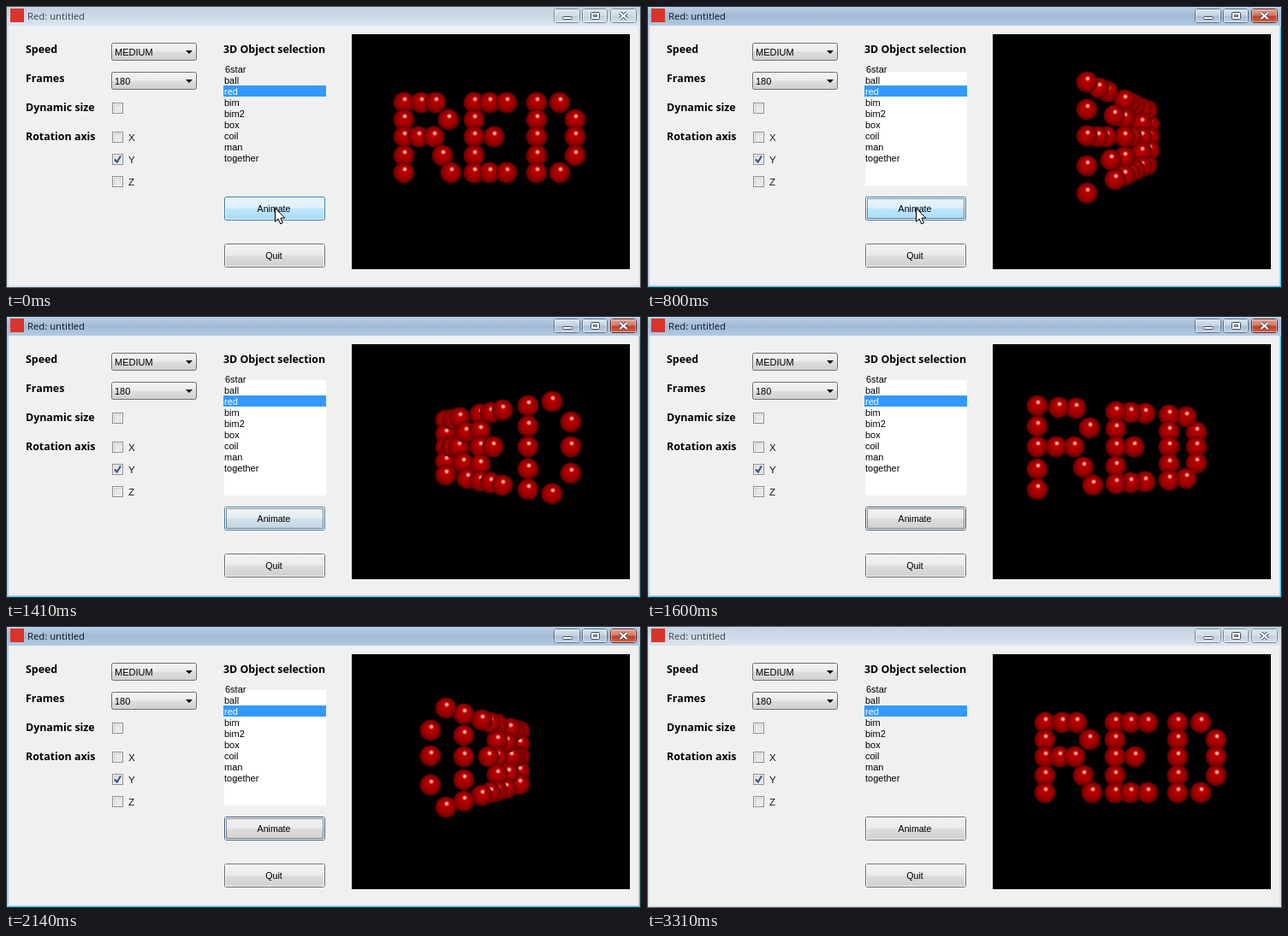
An HTML page with a canvas that plays this animation: 742 px wide and 330 px high, repeating every 3410 ms.

```html
<!DOCTYPE html>
<html lang="en">
<head>
<meta charset="utf-8">
<title>Rotating spheres</title>
<style>
  html, body { margin: 0; width: 100%; height: 100%; overflow: hidden; }
  canvas { display: block; width: 742px; height: 330px; }
</style>
</head>
<body>
<canvas id="stage" width="742" height="330"></canvas>
<script>
const ctx = document.getElementById('stage').getContext('2d');

const LOOP = 3410, START = 550, END = 3310, STEP = 1900 / 31;
const UI = '11px "Liberation Sans", Arial, sans-serif';
const BUTTON_FONT = '10.6px "Liberation Sans", Arial, sans-serif';
const BOLD = 'bold 12.4px "Noto Sans", "Open Sans", sans-serif';
const TITLE = '11.3px "Open Sans", "Noto Sans", sans-serif';

// Rotation in degrees at chosen animation steps.
const TURN = [[1, 0], [4, 72], [14, 312], [21, 484], [26, 603], [31, 720]];

// Sphere columns of the word, row by row: [height, x positions].
const CENTER = { x: 565, y: 154 }, FOCAL = 258, PLANE = 1, RADIUS = 12.5;
const ROWS = [
  [-41, [465, 485, 502, 547, 565, 585, 620, 647]],
  [-21, [465, 517, 547, 620, 665]],
  [-1, [465, 482, 500, 547, 570, 620, 665]],
  [21, [465, 510, 547, 620, 665]],
  [41, [465, 520, 547, 565, 585, 620, 647]]
];
const SPHERES = ROWS.flatMap(([y, xs]) => xs.map(x => ({ x: x - CENTER.x, y })));

const NORMAL = ['#f3f3f3', '#ebebeb', '#dddddd', '#cfcfcf'];
const HOT = ['#eaf6fd', '#d9f0fc', '#bee6fd', '#a7d9f5'];

function vertical(y, h, colors) {
  const g = ctx.createLinearGradient(0, y, 0, y + h);
  const stops = colors.length === 4 ? [0, 0.48, 0.52, 1] : colors.map((_, i) => i / (colors.length - 1));
  colors.forEach((c, i) => g.addColorStop(stops[i], c));
  return g;
}

function rect(x, y, w, h, fill) {
  ctx.fillStyle = fill;
  ctx.fillRect(x, y, w, h);
}

function panel(x, y, w, h, radius, fill, stroke) {
  ctx.beginPath();
  ctx.roundRect(x + 0.5, y + 0.5, w - 1, h - 1, radius);
  ctx.fillStyle = fill;
  ctx.fill();
  ctx.lineWidth = 1;
  ctx.strokeStyle = stroke;
  ctx.stroke();
}

function outline(x, y, w, h, color) {
  ctx.lineWidth = 1;
  ctx.strokeStyle = color;
  ctx.strokeRect(x + 0.5, y + 0.5, w - 1, h - 1);
}

function text(str, x, y, font = UI, color = '#000', align = 'left') {
  ctx.font = font;
  ctx.fillStyle = color;
  ctx.textAlign = align;
  ctx.fillText(str, x, y);
}

function polygon(points, fill, stroke) {
  ctx.beginPath();
  points.forEach(([x, y]) => ctx.lineTo(x, y));
  ctx.closePath();
  ctx.fillStyle = fill;
  ctx.fill();
  if (stroke) {
    ctx.lineWidth = 1;
    ctx.strokeStyle = stroke;
    ctx.stroke();
  }
}

function captionButton(x, w, colors, edge) {
  panel(x, 3, w, 17, 3, vertical(3, 17, colors), edge);
  ctx.strokeStyle = 'rgba(255,255,255,.45)';
  ctx.strokeRect(x + 1.5, 4.5, w - 3, 14);
}

function drawWindow(active) {
  const bar = active ? ['#bfd1e4', '#a0bad6', '#b4cbe3'] : ['#c3d0dd', '#cddae7', '#dbe6f1'];
  rect(0, 0, 742, 330, active ? '#b4cbe3' : '#d7e2ee');
  rect(0, 0, 742, 24, vertical(0, 24, bar));
  rect(3, 23, 736, 304, '#f0f0f0');
  outline(0, 0, 742, 330, active ? '#1f2c38' : '#4a525a');
  if (active) {
    rect(1, 328, 740, 1, '#35c7e6');
    rect(740, 24, 1, 305, '#35c7e6');
  }
  rect(5, 3, 16, 16, '#d9342b');
  text('Red: untitled', 25, 16, TITLE, active ? '#101820' : '#3c444c');

  const glass = active ? ['#dbe6f1', '#c4d4e5', '#a9bfd5', '#bfd3e6'] : ['#dde6ef', '#d2dde8', '#c4d1de', '#d3dfea'];
  const edge = active ? '#596d82' : '#75838f', glyph = '#414b56';
  captionButton(640, 31, glass, edge);
  captionButton(673, 30, glass, edge);
  captionButton(706, 31, active ? ['#e6a898', '#d47763', '#bd3b22', '#d4694d'] : glass, active ? '#602820' : edge);
  panel(650, 12, 12, 4, 1, '#fff', glyph);
  panel(683, 7, 11, 9, 1, '#fff', glyph);
  panel(686, 10, 5, 3, 0, '#c4d1de', glyph);
  for (const [color, width] of [[glyph, 4], ['#fff', 2.2]]) {
    ctx.strokeStyle = color;
    ctx.lineWidth = width;
    ctx.beginPath();
    ctx.moveTo(717.5, 8); ctx.lineTo(725.5, 15);
    ctx.moveTo(725.5, 8); ctx.lineTo(717.5, 15);
    ctx.stroke();
  }
}

function combo(label, y) {
  panel(123, y, 100, 21, 2, vertical(y, 21, NORMAL), '#707070');
  text(label, 127, y + 15);
  polygon([[210, y + 9], [218, y + 9], [214, y + 13]], '#000');
}

function checkbox(y, label, checked) {
  rect(124, y, 13, 13, '#f4f4f4');
  outline(124, y, 13, 13, '#8e8f8f');
  rect(126, y + 2, 9, 9, '#c9ced3');
  rect(127, y + 3, 8, 8, '#e6e8ea');
  if (checked) {
    ctx.strokeStyle = '#3a4d91';
    ctx.lineWidth = 2;
    ctx.beginPath();
    ctx.moveTo(127, y + 6.5);
    ctx.lineTo(129.7, y + 9.5);
    ctx.lineTo(134, y + 2.5);
    ctx.stroke();
  }
  text(label, 143, y + 11, '11.5px "Liberation Sans", Arial, sans-serif', '#1c0c24');
}

function button(label, y, hot = 0, focused = false) {
  panel(255, y, 118, 28, 2, vertical(y, 28, NORMAL), focused ? '#3c5f7c' : '#707070');
  if (hot) {
    ctx.globalAlpha = hot;
    panel(255, y, 118, 28, 2, vertical(y, 28, HOT), '#3c7fb1');
    ctx.globalAlpha = 1;
  }
  ctx.strokeStyle = 'rgba(255,255,255,.75)';
  ctx.strokeRect(256.5, y + 1.5, 115, 25);
  if (focused) {
    ctx.setLineDash([1, 1]);
    outline(257, y + 2, 114, 24, '#222');
    ctx.setLineDash([]);
  }
  text(label, 313, y + 18, BUTTON_FONT, '#000', 'center');
}

function drawControls(active, step) {
  text('Speed', 23, 55, BOLD);
  text('Frames', 23, 89, BOLD);
  text('Dynamic size', 23, 123, BOLD);
  text('Rotation axis', 23, 157, BOLD);
  text('3D Object selection', 254, 55, BOLD);
  combo('MEDIUM', 43);
  combo('180', 77);
  checkbox(113, '', false);
  checkbox(147, 'X', false);
  checkbox(173, 'Y', true);
  checkbox(199, 'Z', false);

  if (active) {
    const top = step < 5 ? 77 : 75;
    rect(255, top, 119, 210 - top, '#fff');
  }
  rect(254, 93, 120, 13, '#3399ff');
  ['6star', 'ball', 'red', 'bim', 'bim2', 'box', 'coil', 'man', 'together'].forEach((name, i) =>
    text(name, i ? 255 : 256, 78 + 13 * i, UI, name === 'red' ? '#fff' : '#000'));
}

function angleAt(step) {
  if (step <= TURN[0][0]) return 0;
  const i = TURN.findIndex(([s]) => s >= step);
  if (i < 0) return 0;
  const [s0, a0] = TURN[i - 1], [s1, a1] = TURN[i];
  return (a0 + (a1 - a0) * (step - s0) / (s1 - s0)) % 360;
}

function radial(x, y, r0, r1, stops) {
  const g = ctx.createRadialGradient(x, y, r0, 0, 0, r1);
  stops.forEach(([at, color]) => g.addColorStop(at, color));
  return g;
}

const BODY = radial(0, -3, 0, RADIUS + 0.5,
  [[0, '#c00000'], [0.4, '#b00000'], [0.7, '#920000'], [0.9, '#6a0000'], [1, '#480000']]);

const GLINT = ctx.createRadialGradient(1, -4, 0, 1, -4, 4);
[[0, '#ffd6cc'], [0.35, '#f29a90'], [1, 'rgba(192,0,0,0)']].forEach(([at, color]) => GLINT.addColorStop(at, color));

function drawSphere(x, y) {
  ctx.save();
  ctx.translate(x, y);
  ctx.beginPath();
  ctx.arc(0, 0, RADIUS, 0, 2 * Math.PI);
  for (const layer of [BODY, GLINT]) {
    ctx.fillStyle = layer;
    ctx.fill();
  }
  ctx.restore();
}

function drawSpheres(degrees) {
  const angle = degrees * Math.PI / 180, cos = Math.cos(angle), sin = Math.sin(angle);
  rect(404, 33, 325, 275, '#000');
  SPHERES.map(({ x, y }) => {
    const z = x * sin + PLANE * (cos - 1);
    const scale = FOCAL / (FOCAL + z);
    return { z, x: CENTER.x + (x * cos - PLANE * sin) * scale, y: CENTER.y + y * scale };
  }).sort((a, b) => b.z - a.z).forEach(({ x, y }) => drawSphere(Math.round(x), Math.round(y)));
}

function drawCursor(x, y) {
  const shape = [[0, 0], [0, 16], [3.7, 12.6], [6.2, 18.5], [8.9, 17.3], [6.4, 11.6], [11.3, 11.6]];
  polygon(shape.map(([dx, dy]) => [x + dx, y + dy]), '#fff', '#000');
}

function draw(t) {
  const active = t >= START && t < END;
  const step = Math.floor((t - START) / STEP + 0.1);
  const leave = Math.max(0, step - 8);
  const hot = t < END ? Math.min(1, Math.max(0, 1 - (step - 10) / 7)) : 0;

  drawWindow(active);
  drawControls(active, step);
  button('Animate', 223, hot, active);
  button('Quit', 278);
  drawSpheres(angleAt(step));
  if (t < END && leave < 6) drawCursor(314.5 + leave * 4, 236.5 + leave * 19);
}

function tick() {
  draw(performance.now() % LOOP);
  requestAnimationFrame(tick);
}
tick();
</script>
</body>
</html>
```
